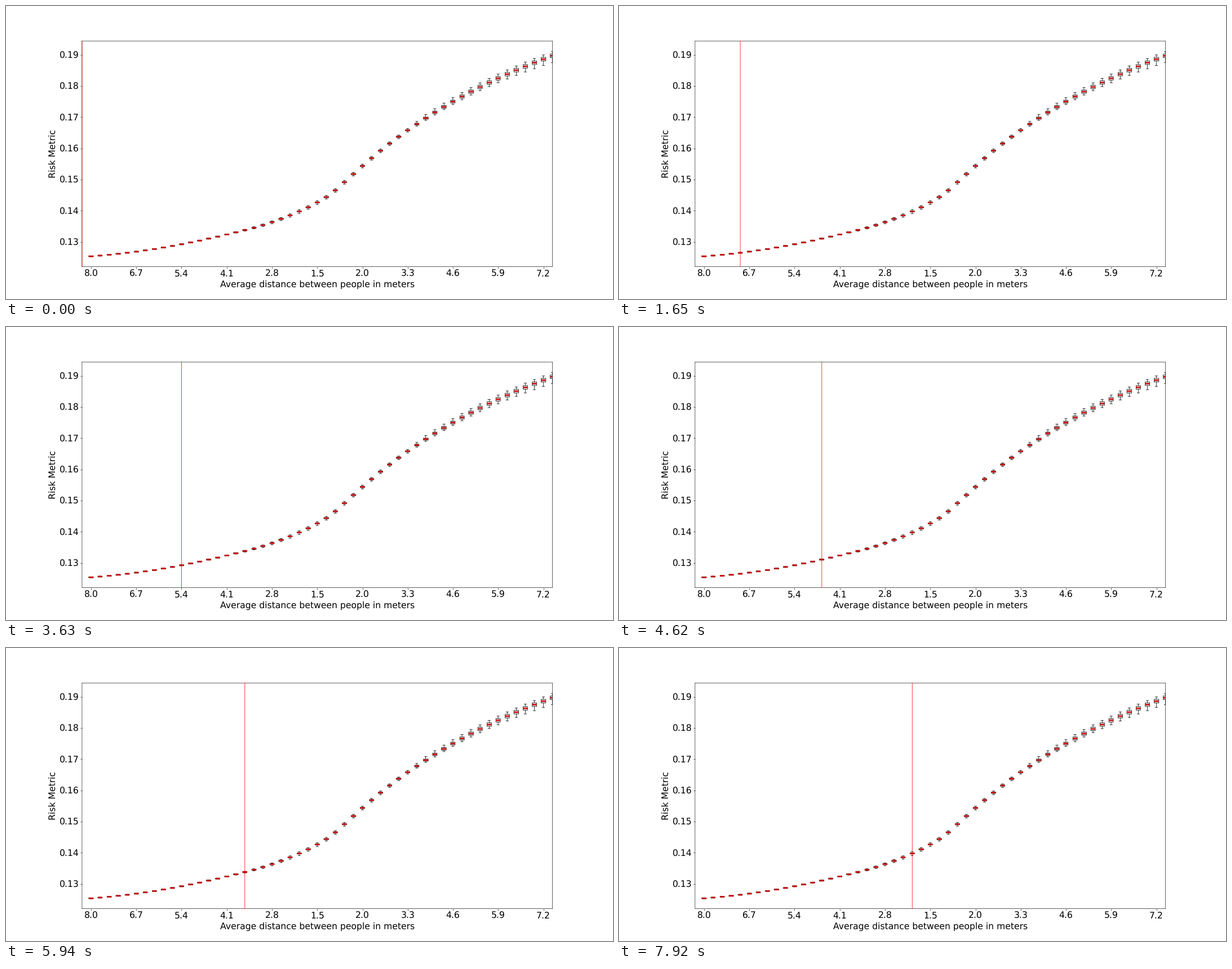
A matplotlib script that plays this animation: 1077x520 px, repeating every 8 s.

```python
import numpy as np
import matplotlib.pyplot as plt
from matplotlib.animation import FuncAnimation
from matplotlib.collections import PolyCollection

WIDTH, HEIGHT, DPI = 1077, 520, 56
LOOP_MS, INTERVAL_MS, STEP_MS = 8000, 40, 330
CANVAS_W, CANVAS_H = 1920, 927  # full-size pixel grid that lines sit on
COUNT = 52
RISK_UNIT = 1e-4
PIXEL = 1.807 * RISK_UNIT  # risk per pixel of height

plt.rcParams.update({"font.family": "DejaVu Sans", "font.size": 20.03,
                     "text.hinting": "none"})

# The rise per step grows to a peak near the closest distance, then eases off.
RISE_AT = [1, 12, 18, 24, 26, 28, 30, 36, 44, 51]
RISE = [2.3, 6.1, 7.4, 13.5, 17.2, 26.2, 26, 19.8, 14.2, 10.8]

# Half box, upper and lower whisker in pixels at a few positions.
SPREAD_AT = [1, 16, 24, 36, 38, 44, 52]
HALF_BOX = [.5, .8, .9, 1.2, 1.9, 3.1, 3.3]
UPPER = [.8, 1, 3, 3, 6.4, 7.4, 7.5]
LOWER = [.8, 1, 3.6, 3.2, 4, 6.5, 12]

pos = np.arange(1, COUNT + 1)
rises = np.interp(pos[:-1], RISE_AT, RISE)
median = (1254 + np.append(0, np.cumsum(rises))) * RISK_UNIT


def spread(sizes):
    return np.interp(pos, SPREAD_AT, sizes) * PIXEL


def distance(i):
    """People approach to 1.5 m, then move apart again."""
    return 8 - 0.26 * (i - 1) if i <= 26 else 2 + 0.26 * (i - 31)


def on_grid(x):
    """Round a horizontal position to the full-size pixel grid."""
    left, scale = 0.125 * CANVAS_W, 0.775 * CANVAS_W / COUNT
    return (np.floor(left + scale * x + 0.5) - left) / scale


def draw_boxes(ax):
    high, low = median + spread(UPPER), median - spread(LOWER)
    q1, q3 = median - spread(HALF_BOX), median + spread(HALF_BOX)
    left, mid, right = on_grid(pos - 0.25), on_grid(pos), on_grid(pos + 0.25)
    black = dict(colors="black", linewidth=1, snap=False)

    corners = [[(l, a), (r, a), (r, b), (l, b)]
               for l, r, a, b in zip(left, right, q1, q3)]
    ax.add_collection(PolyCollection(corners, facecolors="none", zorder=2,
                                     edgecolors="black", linewidth=1, snap=False))
    ax.vlines(mid, q3, high, **black)
    ax.vlines(mid, low, q1, **black)
    for cap in (low, high):
        ax.hlines(cap, pos - 0.16, pos + 0.16, **black)
    ax.hlines(median, left, right, colors="#c81414", linewidth=3.8,
              snap=False, zorder=2.1)


fig, ax = plt.subplots(figsize=(WIDTH / DPI, HEIGHT / DPI), dpi=DPI)
# Lines run through pixel centres, half a grid pixel off the edges.
dx, dy = 0.5 / CANVAS_W, 0.5 / CANVAS_H
fig.subplots_adjust(left=0.125 + dx, right=0.9 + dx,
                    bottom=0.11 + dy, top=0.88 + dy)
for spine in ax.spines.values():
    spine.set_snap(False)
draw_boxes(ax)

ticks = range(1, COUNT, 5)
ax.set_xticks(ticks, [f"{distance(i):.1f}" for i in ticks])
ax.set_yticks(np.arange(13, 20) / 100)
ax.set_xlim(0, COUNT)
ax.set_ylim(0.12209, 0.19446)
ax.set_xlabel("Average distance between people in meters")
ax.set_ylabel("Risk Metric")

cursor = ax.axvline(0, color="red", linewidth=1, snap=False,
                    clip_on=False, zorder=3)


def update(frame):
    # The cursor steps in the frame that contains the change.
    last_ms = (frame + 1) * INTERVAL_MS - 1
    x = on_grid(last_ms // STEP_MS)
    cursor.set_xdata([x, x])
    return (cursor,)


anim = FuncAnimation(fig, update, frames=LOOP_MS // INTERVAL_MS,
                     interval=INTERVAL_MS, repeat=True, repeat_delay=0)
plt.show()
```
